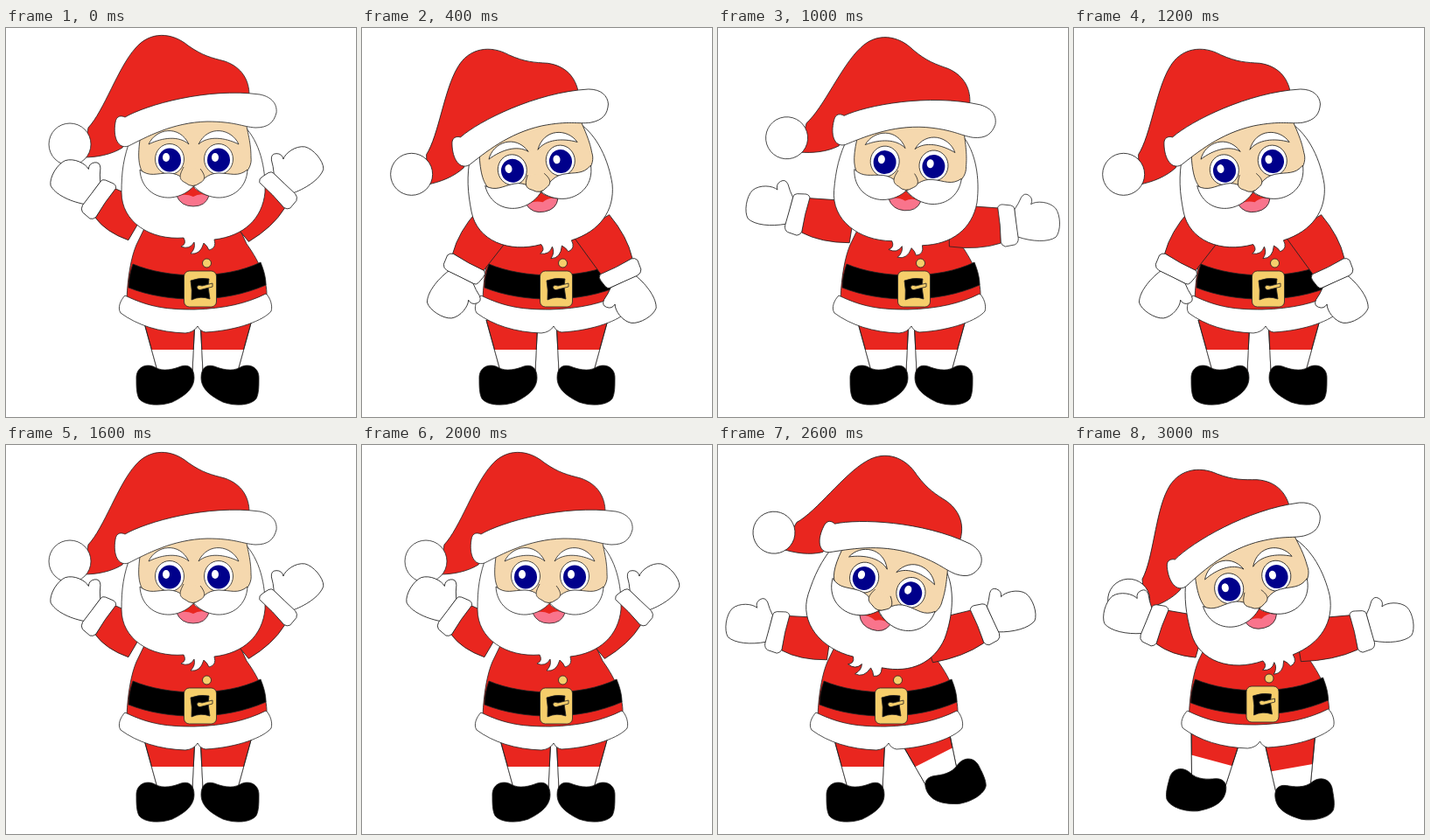
Write an HTML page that moves like this. It is 400 px wide and 445 px high and loops after 3.2 s.

```html
<!DOCTYPE html>
<html lang="en">
<head>
<meta charset="utf-8">
<title>Dancing Santa</title>
<style>
html, body { margin: 0; width: 100%; height: 100%; overflow: hidden; background: #fff; }
svg { display: block; width: 400px; height: 445px; }
</style>
</head>
<body>
<svg id="stage" viewBox="0 0 400 445" stroke="#222" stroke-width=".8" stroke-linejoin="round"></svg>
<script>
const RED = '#e9261f', SKIN = '#f5d8ae', GOLD = '#f6ce6b', NAVY = '#00008b', PINK = '#f9748c';

const path = (d, fill = '#fff', extra = '') => `<path d="${d}" fill="${fill}" ${extra}/>`;
const oval = (x, y, rx, ry = rx, fill = '#fff') =>
  `<ellipse cx="${x}" cy="${y}" rx="${rx}" ry="${ry}" fill="${fill}"/>`;
const group = (transform, inner) => `<g transform="${transform}">${inner}</g>`;
const place = ([x, y], angle, flip, inner) =>
  group(`translate(${x} ${y}) rotate(${angle}) scale(${flip})`, inner);

// Everything on the head turns rigidly around the point between the eyes.
const MID = [214.5, 151];
const bothSides = shape => shape + group(`translate(${2 * MID[0]} 0) scale(-1 1)`, shape);

const eye = x => oval(x, 150, 16.5, 17.5) +
  `<g stroke="none">${oval(x, 151, 13, 13.5, NAVY)}${oval(x - 4, 148, 4, 5)}</g>`;

const beard = path('M272 112C290 130 297 160 296 188C293 218 272 238 238 242Q241 252 232 254Q230 249 226 246Q222 260 211 258Q217 252 215 245Q210 254 200 250Q207 247 203 240C165 243 132 222 132 188C132 165 134 148 143 125L160 110Z');
const skin = path('M153 128C150 150 152 163 160 169L200 182H235L270 169C278 163 281 155 280 148C280 135 278 125 272 100H160Z', SKIN);
const brow = path('M163 133C171 115 198 110 209 133C198 123 179 125 163 133Z');
const mouth = path('M195 192Q207 189 213 181Q220 189 232 192Q228 204 214 204Q200 204 195 192Z', PINK) +
  path('M195 192Q207 189 213 181Q220 189 232 192Q222 188 214 193Q206 189 195 192Z', RED, 'stroke="none"');
const moustache = path('M214.500 181C205 176 200 166 186 166C172 166 164 171 153 162C154 183 170 195 188 194C200 193 209 187 214.500 181Z');
const nose = path('M203 159C199 167 196 173 205 177Q213 184 222 177C230 173 226 166 222 161', SKIN);
const hat = path('M94 114C112 95 128 45 148 23C165 3 190 5 208 20C225 32 235 34 250 38C270 45 278 60 278 77V95L140 122L133 137C120 145 104 148 88 148Z', RED) +
  path('M125 108C126 100 132 100 136 102C160 88 230 68 290 76C305 79 310 88 309 97C306 108 300 114 285 114C270 113 262 107 230 107C190 108 160 125 140 135C128 139 122 125 125 108Z') +
  oval(73, 133, 24);

const headArt = group(`translate(${MID.map(v => -v)})`,
  beard + skin + eye(187) + eye(243) + bothSides(brow) + mouth + bothSides(moustache) + nose + hat);

const belt = path('M145 270C185 287 250 288 291 268C295 278 297 286 297 294C250 315 185 315 140 297C140 287 142 279 145 270Z', '#000');
const trim = path('M136 306C165 320 185 322 215 322C250 321 275 315 297 304C302 308 305 318 303 324C295 334 265 346 228 348Q222 347 219 341Q215 348 205 349C175 348 150 340 131 326C127 320 131 311 136 306Z');
const buckle = `<rect x="203.500" y="278" width="37" height="41" rx="6" fill="${GOLD}"/>` +
  path('M211 289Q221 285 232 287L231 296L233 310Q222 306 212 311Q213 300 211 289Z', '#000') +
  path('M218 296Q220 293 224 295L236 292V296L224 299Q219 301 218 296Z', GOLD);
const bodyArt = path('M165 215L149 248C143 262 139 285 138 310L165 325H270L298 308C299 285 286 262 275 247L260 215Z', RED) +
  belt + trim + buckle + oval(229.5, 269, 5, 5, GOLD);

// Left leg, measured from the hip; the right one is its mirror image.
const legArt = path('M-30-4L-14 54H26L29-4Z', RED) +
  path('M-21 30L-14 54H26L28 30Z', '#fff', 'stroke="none"') +
  path('M-30-4L-14 54H26L29-4', 'none') +
  path('M-38 64C-39 50-27 45-17 50C-7 56 5 52 13 49C23 46 28 52 28 62C28 76 15 84 3 90C-11 95-29 94-35 86C-38 80-38 72-38 64Z', '#000');

const mittenArt = path('M8-17Q13-24 16-31Q20-37 25-33Q30-29 27-23C33-27 48-26 55-18C61-10 61 8 55 15C46 21 28 20 11 14Z') +
  path('M-11-20Q-9-24-4-23L4-22Q8-21 8-18Q10 0 12 16Q12 21 8 23L-3 25Q-7 24-8 20Q-8 0-11-20Z');

// An arm reaches along its own x axis from shoulder to cuff, thumb towards the
// head when it is out and towards the body when it hangs.
function arm(shoulder, cuff, side) {
  const dx = cuff[0] - shoulder[0], dy = cuff[1] - shoulder[1];
  const length = Math.hypot(dx, dy), angle = Math.atan2(dy, dx) * 180 / Math.PI;
  const flip = [1, dy > 30 ? -side : side];
  const wrist = length - 8;
  return {
    sleeve: place(shoulder, angle, flip,
      path(`M0-24L${wrist}-19V21Q${length / 2} 29 0 24Z`, RED)),
    mitten: place(cuff, angle, flip, mittenArt)
  };
}

// head: eye midpoint and tilt; hips: place and tilt; cuffs: ends of both sleeves
const poses = {
  up: { head: [214.5, 151, 0], body: [0, 0], hips: [[187, 338, 0], [251, 338, 0]], cuffs: [[106, 195], [311, 185]] },
  spread: { head: [218, 156, 5], body: [2, 0], hips: [[189, 338, 0], [253, 338, 0]], cuffs: [[91, 212], [331, 225]] },
  down: { head: [199, 158, -11], body: [0, 0], hips: [[172, 338, 0], [251, 338, 0]], cuffs: [[117, 276], [295, 281]] },
  kick: { head: [193, 161, 18], body: [-24, 0], hips: [[162, 338, 0], [236, 329, -27]], cuffs: [[68, 213], [305, 204]] },
  lean: { head: [204, 158, -15], body: [-6.5, -2], hips: [[162, 331, 15], [247, 339, -10]], cuffs: [[92, 205], [329, 212]] }
};

function draw({ head, body, hips, cuffs }) {
  const shoulders = [[152, 222], [262, 226]];
  const sides = [-1, 1];
  const arms = sides.map((side, i) =>
    arm(shoulders[i].map((v, k) => v + body[k]), cuffs[i], side));
  const legs = hips.map(([x, y, tilt], i) => place([x, y], tilt, [-sides[i], 1], legArt));
  return legs.join('') + place(body, 0, 1, bodyArt) +
    arms.map(a => a.sleeve).join('') +
    place(head, head[2], 1, headArt) +
    arms.map(a => a.mitten).join('');
}

const dance = ('up spread down spread up spread down spread ' +
  'up kick up lean down kick down lean').split(' ');
const STEP = 200;
const stage = document.getElementById('stage');
const start = performance.now();
let shown;

function tick() {
  const beat = Math.floor((performance.now() - start) / STEP) % dance.length;
  if (dance[beat] !== shown) {
    shown = dance[beat];
    stage.innerHTML = draw(poses[shown]);
  }
  requestAnimationFrame(tick);
}
tick();
</script>
</body>
</html>
```
